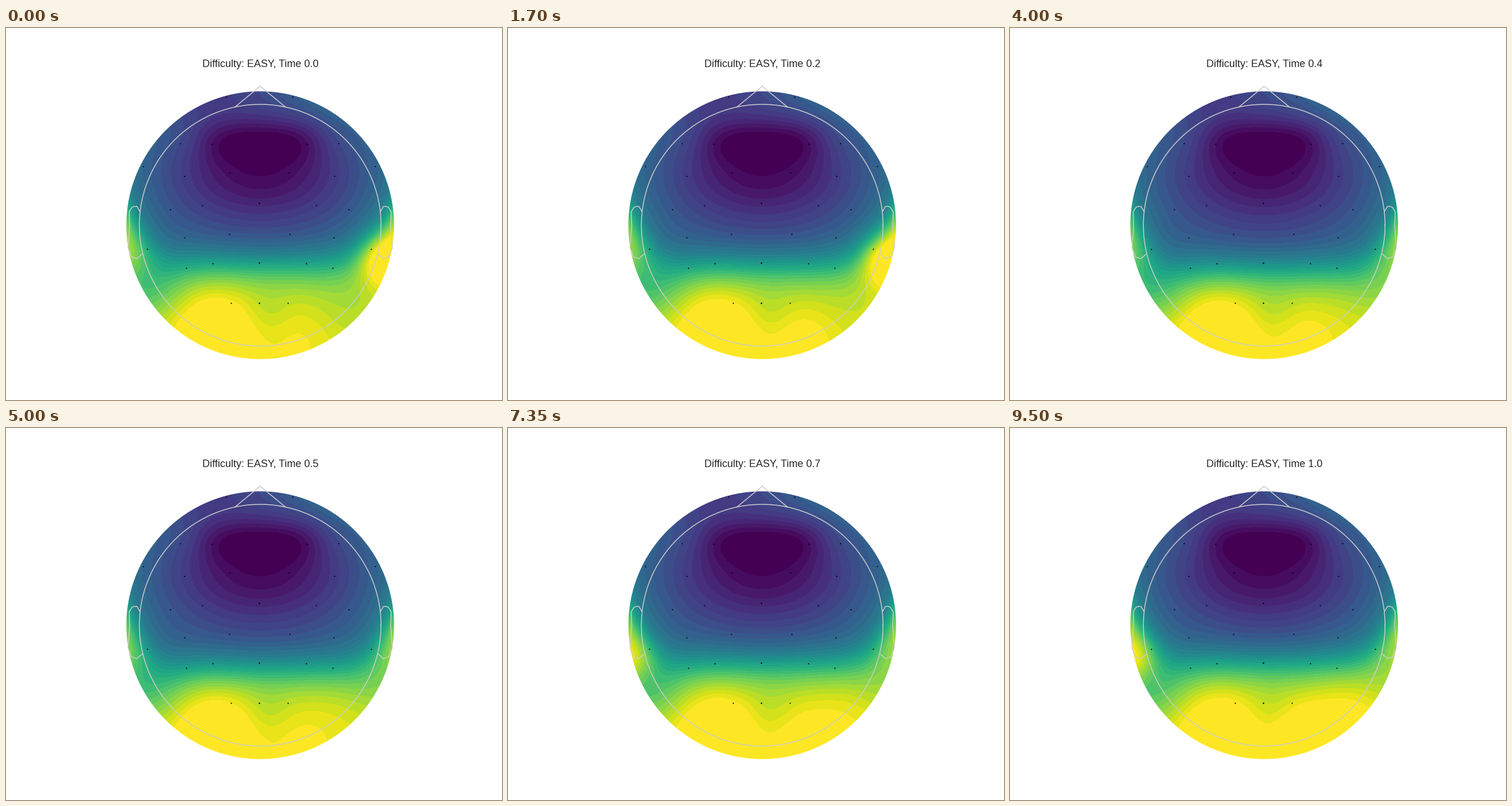
A matplotlib script that plays this animation: 864x648 px, repeating every 10 s.

```python
import math

import numpy as np
import matplotlib.pyplot as plt
from matplotlib.animation import FuncAnimation
from matplotlib.patches import Circle

W, H, DPI = 864, 648, 72
CX, CY, R = 442.8, 343.5, 233.2
HEAD = 421.0          # head diameter
BANDS = 30
INTERVAL, LOOP = 50, 10000
X0, X1, Y0, Y1 = 209, 677, 110, 578

# Bursts of updates: first and last time in ms, number of steps.
BURSTS = [(0, 0, 1), (500, 1350, 9), (1550, 2550, 8), (2700, 3500, 7),
          (3750, 4000, 4), (4400, 4700, 5), (5000, 5000, 1), (5350, 5650, 5),
          (6000, 7000, 9), (7250, 8150, 7), (8350, 9350, 9), (9400, 9500, 3)]
STEPS = np.concatenate([np.round(np.linspace(a, b, n) / INTERVAL) * INTERVAL
                        for a, b, n in BURSTS])

# Electrodes sit in mirrored pairs: distance from the midline, height.
PAIRS = [(57.5, 120), (138, 201), (83, 201.5), (202, 240.5), (51, 252),
         (130.5, 257.5), (0, 304.5), (99, 308.5), (155.5, 316), (52.5, 359),
         (130, 365), (195, 385), (81.5, 410), (0, 408.5), (127.5, 417.5),
         (49.5, 478.5), (0, 479)]
MIDLINE = 441

# Scalp coordinates: unit disc, y towards the nose.
X, Y = np.meshgrid((np.arange(X0, X1) + .5 - CX) / R,
                   (CY - np.arange(Y0, Y1) - .5) / R)


def bump(x, y, sx, sy=None, power=2):
    """Bell around (x, y); a higher power flattens it sideways."""
    sy = sy or sx
    return np.exp(-np.abs((X - x) / sx) ** power / 2 - ((Y - y) / sy) ** 2 / 2)


def rise(t, a, b):
    u = min(max((t - a) / (b - a), 0), 1)
    return u * u * (3 - 2 * u)


def pulse(t, mid, width):
    return math.exp(-((t - mid) / width) ** 2)


# Front-to-back step, bent forward near the ears
FRONT = .22 + .19 * X ** 2
EDGE = -.29 + .43 * X ** 6

STILL = (-.175 * bump(0, .38, .5, .22)                       # frontal pit
         - .15 * bump(0, .63, .38, .12, power=4)
         + (.02 + .2 * X) * np.exp(-((Y - 1) / .2) ** 2)     # forehead tilt
         - .25 * bump(-.9, -.42, .22)                        # left trough
         + .2 * bump(-.36, -.85, .2, .245)                   # left rear peak
         - .045 * bump(.06, -.65, .12))                      # rear valley

LEFT_EAR = bump(-.97, -.25, .13)
RIGHT_EAR = bump(.92, -.24, .13)
RIGHT_TROUGH = bump(.9, -.42, .22)
RIGHT_REAR = bump(.7, -.6, .22)
RIGHT_PEAK = bump(.3, -.85, .18)


def potential(t):
    """Scalp potential at t seconds, about 0 to 1."""
    dip = pulse(t, 3.9, 2.2)
    step = 1 / (1 + np.exp((Y - EDGE + .045 * dip) / .102))
    return (FRONT + (.94 - FRONT) * step + STILL
            + (.09 - .07 * dip + .15 * rise(t, 6.2, 7.6)) * LEFT_EAR
            + .28 * (1 - rise(t, 1.9, 3.1)) * RIGHT_EAR
            - (.12 * rise(t, 2, 4) + .08 * pulse(t, 6, .8)) * RIGHT_TROUGH
            + (-.06 + .018 * t) * RIGHT_REAR
            + (.04 + .055 * pulse(t, 2.7, 1.3)
               + .12 * rise(t, 6, 9.5)) * RIGHT_PEAK)


def bands(ms):
    return np.clip(np.floor(potential(ms / 1000) * BANDS), 0, BANDS - 1)


fig = plt.figure(figsize=(W / DPI, H / DPI), dpi=DPI, facecolor="white")
ax = fig.add_axes([0, 0, 1, 1])
scalp = ax.imshow(bands(0), cmap="viridis", vmin=0, vmax=BANDS - 1,
                  extent=(X0, X1, Y1, Y0), interpolation="nearest")
scalp.set_clip_path(Circle((CX, CY), R, transform=ax.transData))
ax.set_aspect("auto")
ax.set_xlim(0, W)
ax.set_ylim(H, 0)
ax.axis("off")


def outline(x, y):
    ax.plot(CX + HEAD * np.asarray(x), CY - HEAD * np.asarray(y),
            color="#cccccc", lw=1.5, solid_joinstyle="round")


turn = np.linspace(0, 2 * math.pi, 201)
outline(.5 * np.cos(turn), .5 * np.sin(turn))
outline([-.1047, 0, .1047], [.4889, .575, .4889])
ear_x = np.array([.497, .510, .518, .5299, .5419, .54, .547, .532, .510, .489])
ear_y = [.0555, .0775, .0783, .0746, .0555, -.0055, -.0932, -.1313, -.1384,
         -.1199]
outline(ear_x, ear_y)
outline(-ear_x, ear_y)

for half, y in PAIRS:
    ax.scatter([MIDLINE - half, MIDLINE + half], [y, y], s=4.5, color="black",
               linewidths=0, zorder=5)
title = ax.text(CX, 67.9, "", ha="center", va="baseline", color="#262626",
                family="Liberation Sans", size=18)


def update(i):
    ms = STEPS[STEPS <= i * INTERVAL].max()
    scalp.set_data(bands(ms))
    title.set_text(f"Difficulty: EASY, Time {math.floor(ms / 1000 + .5) / 10:.1f}")
    return scalp, title


anim = FuncAnimation(fig, update, frames=LOOP // INTERVAL, interval=INTERVAL,
                     repeat=True, repeat_delay=0)
plt.show()
```
